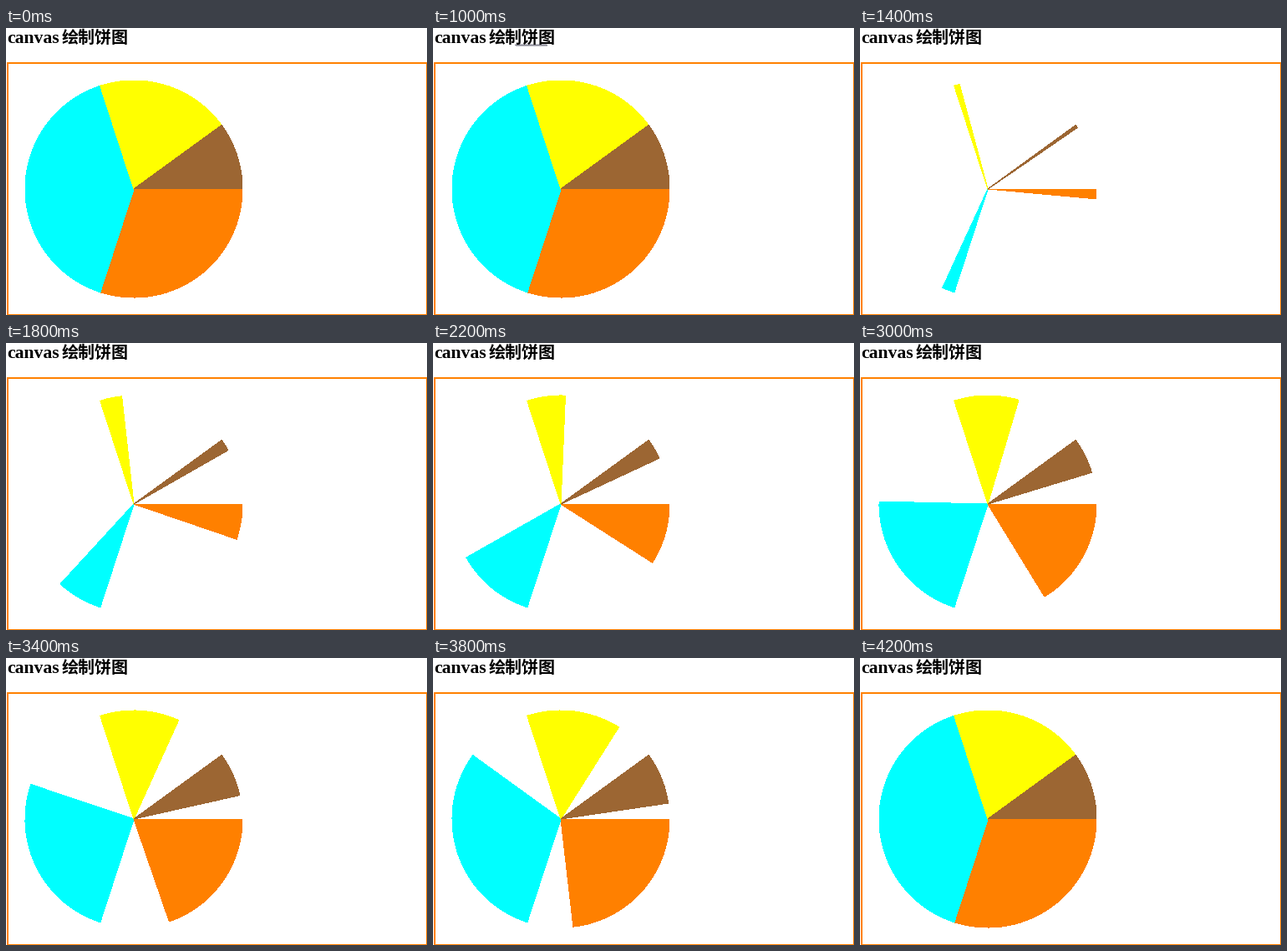
Recreate the animation shown at these times as a matplotlib script. Size 504x344 px, loop 5.6 s.

```python
import matplotlib.pyplot as plt
import numpy as np
from matplotlib.animation import FuncAnimation
from matplotlib.patches import Rectangle, Wedge

W, H, DPI = 504, 344, 100
STEP, FRAMES = 200, 28
RESTART, DONE = 7, 21
CENTER, RADIUS = (153, 193), 130
ORANGE = "#ff8000"

# colour, start angle, sweep after 0, 4, 8, 12 and 14 steps of growth
SLICES = [
    (ORANGE, 0, (5.2, 32.6, 58.5, 83.4, 108)),
    ("#00ffff", 108, (6.6, 42.4, 73.3, 107.9, 144)),
    ("#ffff00", 252, (2.9, 20.4, 34.5, 50.2, 72)),
    ("#9c6633", 324, (1.5, 11.0, 19.1, 27.6, 36)),
]
KEYS = (0, 4, 8, 12, 14)

fig = plt.figure(figsize=(W / DPI, H / DPI), dpi=DPI, facecolor="white")
ax = fig.add_axes([0, 0, 1, 1])
ax.set_xlim(0, W)
ax.set_ylim(H, 0)
ax.axis("off")


def bar(x, y, w, h, color):
    patch = Rectangle((x, y), w, h, fc=color, lw=0, antialiased=False)
    return ax.add_patch(patch)


def label(x, text, font, px):
    ax.text(x, 17.5, text, family=font, size=px * 72 / DPI,
            weight="bold", color="black", va="baseline")


# canvas border, cut off at the right and bottom edges
bar(1, 41, 503, 2, ORANGE)
bar(1, 41, 2, 303, ORANGE)
bar(503, 41, 1, 303, ORANGE)
bar(1, 343, 503, 1, ORANGE)

label(1.5, "canvas", "Liberation Serif", 21.6)
label(66.5, "绘制饼图", "Noto Sans CJK JP", 20)

# shadow that briefly shows under the title
shadow = [
    bar(98, 19, 38, 1, "#c8c8d0"),
    bar(98, 20, 39, 1, "#8c8c98"),
    bar(99, 21, 38, 1, "#b4b4bc"),
]

wedges = [
    ax.add_patch(Wedge(CENTER, RADIUS, start, start + sweeps[-1],
                       fc=color, lw=0, antialiased=False))
    for color, start, sweeps in SLICES
]


def update(i):
    step = i - RESTART if RESTART <= i < DONE else KEYS[-1]
    for wedge, (_, start, sweeps) in zip(wedges, SLICES):
        wedge.set_theta2(start + np.interp(step, KEYS, sweeps))
    for part in shadow:
        part.set_visible(5 <= i < RESTART)
    return wedges + shadow


anim = FuncAnimation(fig, update, frames=FRAMES, interval=STEP,
                     repeat=True, repeat_delay=0, blit=False)
plt.show()
```
